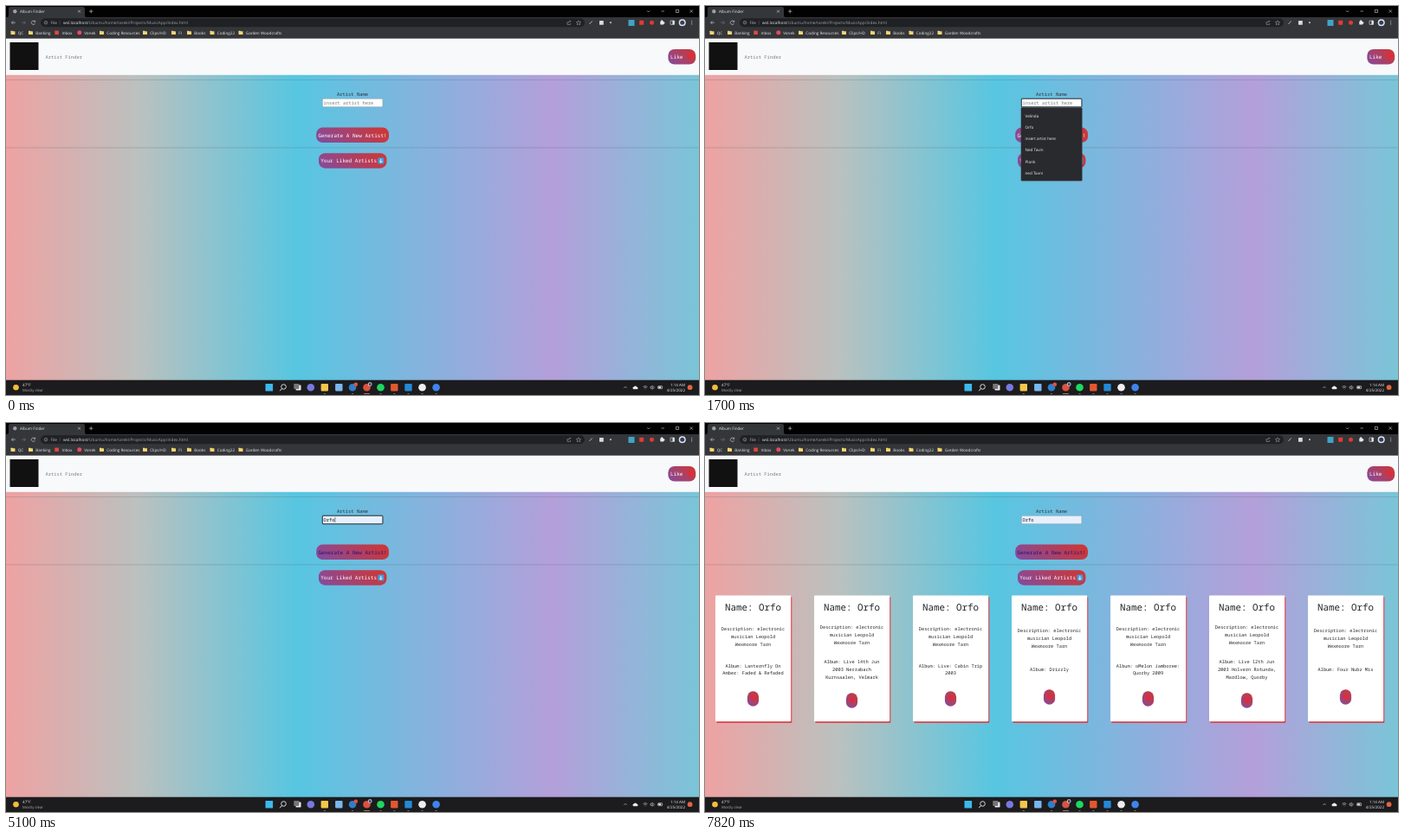
Write an HTML page that moves like this. It is 800x450 px and loops after 8.5 s.

```html
<!DOCTYPE html>
<html lang="en">
<head>
<meta charset="utf-8">
<title>Album Finder</title>
<style>
html, body { margin: 0; width: 100%; height: 100%; overflow: hidden; background: #000; }
svg { display: block; width: 100vw; height: 100vh; }
text { font: 4.6px "Open Sans", "Noto Sans", sans-serif; text-rendering: geometricPrecision; white-space: pre; }
text.mono { font-family: "Noto Sans Mono", "DejaVu Sans Mono", monospace; }
</style>
</head>
<body>
<svg id="stage" viewBox="0 0 800 450"></svg>
<script>
const HOLD = 1700, SCENES = 5;
const ARTIST = 'Orfo';
const SUGGESTIONS = ['Velinda', ARTIST, 'insert artist here', 'Ned Tavin', 'Plonk', 'ned Tavni'];
const ALBUMS = [
  ['Lanternfly On', 'Amber: Faded &amp; Refaded'],
  ['Live 14th Jun', '2003 Nerrabach', 'Kurnsaalen, Velmark'],
  ['Live: Cabin Trip', '2003'],
  ['Drizzly'],
  ['oMelon Jamboree:', 'Quorby 2009'],
  ['Live 12th Jun', '2003 Holvern Rotunda,', 'Mardlow, Quorby'],
  ['Four Nubz Mix']
];

const rect = (x, y, w, h, fill, r = 0, extra = '') =>
  `<rect x="${x}" y="${y}" width="${w}" height="${h}" rx="${r}" fill="${fill}" ${extra}/>`;
const dot = (x, y, r, fill, extra = '') =>
  `<circle cx="${x}" cy="${y}" r="${r}" fill="${fill}" ${extra}/>`;
const line = (d, stroke = '#d5d6d8', width = .6) =>
  `<path d="${d}" fill="none" stroke="${stroke}" stroke-width="${width}"/>`;
const label = (s, x, y, fill = '#e8eaed', size = 4.6, anchor = 'start') =>
  `<text x="${x}" y="${y}" fill="${fill}" style="font-size:${size}px" text-anchor="${anchor}">${s}</text>`;
const mono = (s, x, y, fill = '#212529', size = 5.35, anchor = 'start') =>
  `<text class="mono" x="${x}" y="${y}" fill="${fill}" style="font-size:${size}px" text-anchor="${anchor}">${s}</text>`;
const heart = (x, y) =>
  `<path transform="translate(${x} ${y})" fill="#e32b35" d="M0 3.2C-5-.2-3.6-3-1.8-3Q-.5-3 0-1.8Q.5-3 1.8-3C3.6-3 5-.2 0 3.2Z"/>`;

// Pill with a 45 degree purple-to-red gradient
function pill(x, y, w, h) {
  const id = `g${x}-${y}`, cx = x + w / 2, cy = y + h / 2, d = (w + h) / 4;
  return `<linearGradient id="${id}" gradientUnits="userSpaceOnUse" x1="${cx - d}" y1="${cy + d}" x2="${cx + d}" y2="${cy - d}">
    <stop stop-color="#824ca0"/><stop offset="1" stop-color="#d3352f"/></linearGradient>` +
    rect(x, y, w, h, `url(#${id})`, Math.min(w / 2, 7.2));
}

function browser() {
  const folders = [[5.5, 'QC'], [26, 'Banking'], [108, 'Coding Resources'], [158, 'Clips/HD'],
    [191, 'FI'], [209, 'Books'], [235.5, 'Coding22'], [268.5, 'Garden Woodcrafts']];
  const shift = x => x + 8.3;
  return rect(0, 0, 800, 14, '#020202') +
    '<path d="M1 13Q3 13 3 11V3Q3 1 5 1H89Q91 1 91 3V11Q91 13 93 13Z" fill="#35363a"/>' +
    dot(10.3, 6.2, 2.2, '#9aa0a6') + label('Album Finder', 16, 7.8) +
    line('M83 4.7l3 3m0-3l-3 3M96 6.2h4.4M98.2 4v4.4') +
    line('M740 5.4l1.6 1.6 1.6-1.6M756.5 6h3.4M773.4 4.3h3.2v3.2h-3.2zM789.6 4.4l3.3 3.3m0-3.3l-3.3 3.3') +
    rect(0, 13, 800, 24.7, '#35363a') + rect(40, 14.2, 628, 10, '#202124', 5) +
    line('M11 19.2H6.5m2-2l-2 2 2 2') + line('M18 19.2h4.5m-2-2l2 2-2 2', '#77797d') +
    line('M33.4 18.1A2.2 2.2 0 1 0 33.6 20M33.7 16.6v1.8h-1.8') +
    dot(46, 19.2, 1.8, 'none', 'stroke="#b5b7ba" stroke-width=".5"') + line('M46 18.9v1.4M46 17.9v.5', '#b5b7ba', .5) +
    label('File', 51.5, 20.9, '#b8babd') + line('M62.2 16.8v4.8', '#6a6c70', .4) +
    label('<tspan fill="#e8eaed">wsl.localhost</tspan>/Ubuntu/home/tarekl/Projects/MusicApp/index.html', 66, 20.9, '#9aa0a6', 4.75) +
    line('M648 18v3.4h3.6V20M648.8 19.6q.4-2 3-2m-1-1l1 1-1 1', '#b5b7ba', .5) +
    line('M661 16.8l.8 1.7 1.8.2-1.3 1.2.4 1.8-1.7-.9-1.7.9.4-1.8-1.3-1.2 1.8-.2z', '#b5b7ba', .5) +
    line('M673.5 21l3.2-3.6', '#c9a8a0', 1) + rect(685, 16.9, 4.8, 4.8, '#d9dadb', .5) +
    dot(698, 19.2, 1.1, '#aab0ce') + rect(718.5, 16, 7, 7, '#3fa4c6', .5) +
    rect(731.2, 16.8, 5, 5, '#e33b32', .5) + dot(745.5, 19.2, 2.5, '#e03a34') +
    rect(755.3, 17.5, 4, 4, '#e8eaed', .6) + dot(757.2, 17.2, 1, '#e8eaed') + dot(759.5, 19.4, 1, '#e8eaed') +
    rect(767, 17, 4.6, 4.4, 'none', .4, 'stroke="#e8eaed" stroke-width=".6"') + rect(769.4, 17, 2.2, 4.4, '#e8eaed') +
    dot(780.7, 19.2, 4, '#dfe3ee') + dot(780.7, 19.2, 2.5, '#343d5c') +
    [17.3, 19.2, 21.1].map(y => dot(791.7, y, .5, '#e8eaed')).join('') +
    folders.map(([x, s]) => rect(x, 28.7, 2.3, 1.4, '#f6d56f', .3) + rect(x, 29.2, 5, 3.7, '#f6d56f', .5) +
      label(s, shift(x), 32.5)).join('') +
    rect(56.3, 28.6, 4.6, 4.4, '#e2483d') + label('Inbox', 64.4, 32.5) +
    dot(84.8, 30.8, 2.5, '#e84a5f') + label('Vonek', 90.2, 32.5);
}

function taskbar() {
  const apps = [[351.8, '#7779dd', 1], [367.8, '#f5c64a'], [384.3, '#78b7ef'], [400, '#2c7fcb', 1], [416.5, '#dc5141', 1],
    [432.5, '#1ed760', 1], [448.3, '#e4572e'], [464.5, '#2389d7'], [480.5, '#f0edf0', 1], [496.6, '#3f83ee', 1]];
  return rect(0, 432.7, 800, 17.3, '#1c1b1d') + dot(11.5, 441.2, 3.3, '#f4bd3b') +
    label('47°F', 19, 440) + label('Mostly clear', 19, 446, '#aeb0b3', 4.3) +
    rect(299.5, 437, 8.6, 8.6, '#3db8ee', .5) +
    dot(320.5, 440.5, 2.8, 'none', 'stroke="#eee" stroke-width=".9"') + line('M318.5 442.7l-2.3 2.5', '#eee', 1) +
    rect(334.5, 438.5, 6, 6, '#eee', .4) + rect(332.3, 437, 6, 6, '#777', .4) +
    apps.map(([x, c, round]) => round ? dot(x, 441.2, 4.3, c) : rect(x - 4.2, 437, 8.4, 8.4, c, .8)).join('') +
    dot(403.8, 437.8, 2.3, '#e4503c') + dot(420.2, 437.5, 2.3, '#dfe3ee') + dot(420.2, 437.5, 1.5, '#343d5c') +
    [367.8, 400, 432.5, 448.3, 464.5, 480.5, 496.6].map(x => rect(x - 1.2, 448, 2.4, .8, '#8b8d90', .4)).join('') +
    rect(413, 447.9, 7, .9, '#d29b75', .4) +
    line('M713.3 442l1.7-1.7 1.7 1.7') +
    '<path d="M724 443.2q-1.3-2.3 1-2.6q1.3-2.2 3.1 0q2.2.6 1 2.6z" fill="#eee"/>' +
    line('M735.6 440.5q2.4-2 4.8 0M736.5 441.8q1.5-1.3 3 0M738 443v.5M744 440.4h1l1.3-1.2v4.2l-1.3-1.2h-1zM747.5 439.8q1.3 1.5 0 3') +
    rect(752.6, 439.7, 5, 3, 'none', .5, 'stroke="#eee" stroke-width=".6"') + rect(753.2, 440.3, 3, 1.8, '#eee') +
    label('1:14 AM', 784, 440, '#e8eaed', 4.5, 'end') + label('4/25/2022', 784, 446, '#e8eaed', 4.5, 'end') +
    dot(789.6, 441.2, 2.9, '#dd6640');
}

function field(scene) {
  const filled = scene > 1, focus = scene > 0 && scene < 4;
  return mono('Artist Name', 400, 103.8, '#29323a', 5.45, 'middle') +
    rect(365.3, 107.2, 69.6, 9.6, filled ? '#e8f0fe' : '#fff', focus ? .7 : 0,
      `stroke="${focus ? '#15171a' : '#8c979f'}" stroke-width="${focus ? .9 : .5}"`) +
    mono(filled ? ARTIST : 'insert artist here', 366.6, 113.8, filled ? '#111' : '#777') +
    (filled && focus ? rect(379.7, 109, .5, 6, '#111') : '');
}

function suggestions() {
  return rect(364.9, 117.5, 70.4, 84.8, '#292a2d', 1, 'stroke="#45464a" stroke-width=".4"') +
    SUGGESTIONS.map((s, i) => label(s, 369.5, 128.9 + i * 13.15, '#f1f3f4')).join('');
}

function card(lines, i) {
  const n = lines.length, x = 12 + i * 114, cx = x + 43.5;
  const para = (rows, y) => rows.map((s, k) => mono(s, cx, y + k * 8.9, '#212529', 5.33, 'middle')).join('');
  const y = 315 + 2 * n;
  return rect(x + 1.3, 201.3, 87, 145.6, '#d8424a', 1) + rect(x, 199.6, 87.2, 145.6, '#fff', 1) +
    mono('Name: ' + ARTIST, cx, 216.6, '#212529', 10.8, 'middle') +
    para(['Description: electronic', 'musician Leopold', 'Wexmoore Tarn'], 243.8 - 2 * n) +
    para(['Album: ' + lines[0], ...lines.slice(1)], 291.3 - 4.4 * n) +
    pill(cx - 6.6, y - 8.8, 13.2, 17.6) + heart(cx, y);
}

function render(scene) {
  const hover = scene > 2;
  return '<linearGradient id="sky"><stop stop-color="#eea2a2"/><stop offset=".19" stop-color="#bbc1bf"/>' +
    '<stop offset=".42" stop-color="#57c6e1"/><stop offset=".79" stop-color="#b49fda"/><stop offset="1" stop-color="#7ac5d8"/></linearGradient>' +
    rect(0, 79, 800, 355, 'url(#sky)') + browser() +
    rect(0, 37.6, 800, 42.2, '#f8f9fa') + rect(4.5, 42, 33, 32, '#111') +
    mono('Artist Finder', 45.5, 60.6, '#7c7e80', 5.45) +
    pill(764.4, 50, 31.8, 17.6) + mono('Like', 767, 60.9, '#fff', 6) + heart(790, 58.8) +
    rect(0, 85.3, 800, .5, '#59636c', 0, 'opacity=".5"') + rect(0, 163.7, 800, .5, '#59636c', 0, 'opacity=".5"') +
    field(scene) +
    pill(358.2, 140.6, 83.8, 17.5) +
    mono('Generate A New Artist!', 400, 151.6, hover ? '#24127c' : '#fff', 6, 'middle') +
    pill(361, 170.2, 78.4, 17.5) + mono('Your Liked Artists', 363.2, 181.1, '#fff', 6) +
    rect(429.3, 175.6, 7, 7, '#3b9fe0', .8) + line('M432.8 176.8v4.3m-1.7-1.6l1.7 1.7 1.7-1.7', '#fff', .9) +
    (scene === 1 ? suggestions() : '') +
    (scene === 4 ? ALBUMS.map(card).join('') : '') + taskbar();
}

const stage = document.getElementById('stage');
const start = performance.now();
let shown = -1;
function tick() {
  const scene = Math.floor((performance.now() - start) / HOLD) % SCENES;
  if (scene !== shown) stage.innerHTML = render(shown = scene);
  requestAnimationFrame(tick);
}
tick();
</script>
</body>
</html>
```
